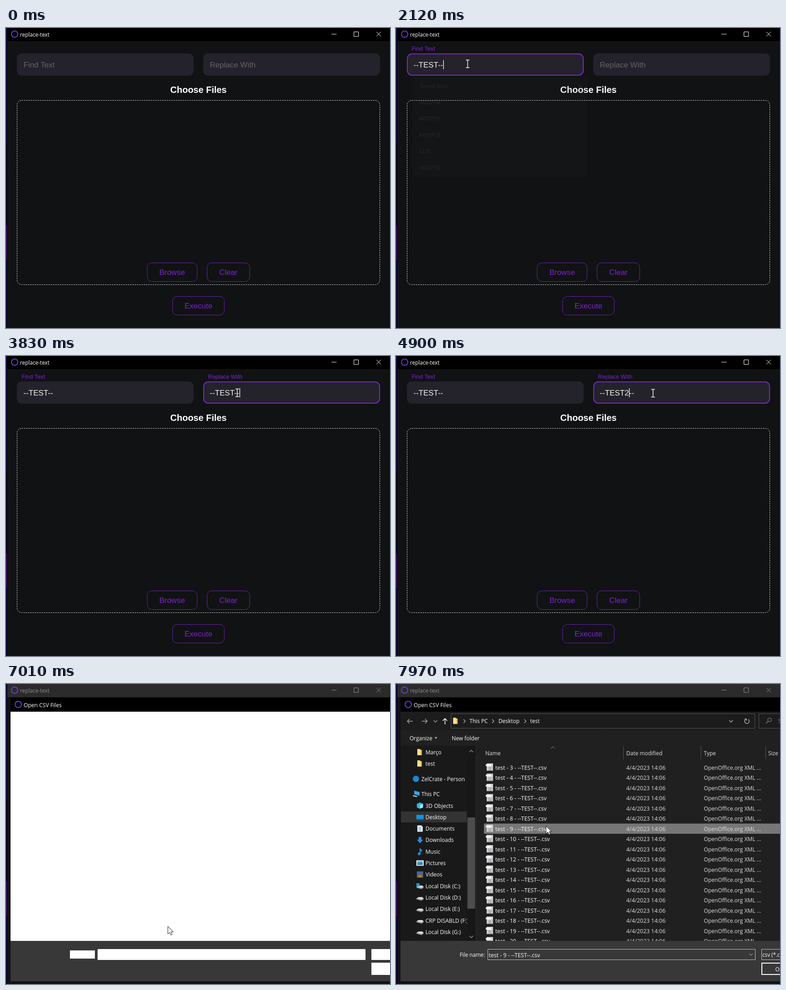
Animation of 847 by 661 pixels, one loop 8 s. Source, as an HTML page with a canvas:

```html
<!DOCTYPE html>
<html lang="en">
<head>
<meta charset="utf-8">
<title>replace-text</title>
<style>
  html, body { margin: 0; width: 100%; height: 100%; overflow: hidden; background: #111214; }
  canvas { display: block; }
</style>
</head>
<body>
<canvas id="stage" width="847" height="661"></canvas>
<script>
const ctx = document.getElementById('stage').getContext('2d');
const LOOP = 8000;
const PURPLE = '#7a24cf', PAGE = '#111214';
const APP_FONT = '"Liberation Sans", Arial, sans-serif';
const UI_FONT = '"Open Sans", "Noto Sans", sans-serif';

// Pointer path: time, x, y
const PATH = [
  [590, 262, 664], [1200, 171, 82], [1500, 171, 82], [1750, 158, 79], [2220, 158, 79],
  [2670, 577, 99], [3150, 577, 99], [3690, 510, 81], [3830, 510, 81], [4020, 502, 82],
  [4240, 502, 82], [4430, 567, 82], [5420, 567, 82], [5990, 360, 480], [6200, 357, 534],
  [7100, 357, 534], [7760, 331, 313]
];
const CLICKS = [[1220, 1420], [3000, 3140], [4160, 4300], [6330, 6470], [7830, 7940]];
const PASTE_FIND = 2050, PASTE_REPLACE = 3540, DIALOG = 7010, FILLED = 7150, SELECT = 7830;
const SAVED = ['AKJDP54', 'AKJDP51', 'AKJDP53', '1233.', 'AKJDP55'];

// Small icons, drawn around their centre
const DISK = [['#d8dadc', 'M-8 2L-3-1H5L8 2L3 5z'], ['#8b8f93', 'M-8 2L3 5L8 2V4L3 7L-8 4z']];
const ICONS = {
  folder: [['#e9b949', 'M-5-7h5l2 2h3V7H-5z'], ['#fbe08f', 'M-5-6h7V7h-7z']],
  cloud: [['#1a86d9', 'M-7 0a7 7 0 1 0 14 0a7 7 0 1 0-14 0z']],
  pc: [['#35a4e8', 'M-5-7L7-4V4L-5 1z'], ['#c9d4dc', 'M-8 3L3 5L0 7L-8 5z']],
  cube: [['#31b8e6', 'M0-7L7-4V4L0 7L-7 4V-4z'], ['#a5e6f7', 'M0-1L6-4V4L0 6z']],
  desktop: [['#1791e0', 'M-8-5H8V6H-8z'], ['#0b62a8', 'M-8 4H8V6H-8z']],
  page: [['#e9eef2', 'M-6-7h9l3 3V7H-6z'], ['#4a9bd6', 'M-4-3h7v1h-7zM-4 0h7v1h-7zM-4 3h7v1h-7z']],
  down: [['#2f8de0', 'M-3-7h6v6h4L0 7L-7-1h4z']],
  music: [['#2196e8', 'M-1-8L5-3L3 1L1-3V4A3 3 0 1 1-1 2z']],
  picture: [['#f1f4f6', 'M-8-6H8V6H-8z'], ['#4aa3dd', 'M-6-4H6V1L2-1L-2 2L-6 0z'], ['#2f6d8f', 'M-6 0L-2 2L2-1L6 1V4H-6z']],
  video: [['#59616b', 'M-7-7H7V7H-7z'], ['#2a6fb5', 'M-4-6H4V-1H-4z'], ['#b8792f', 'M-4 1H4V6H-4z']],
  disk: DISK,
  system: [...DISK, ['#1a9be8', 'M-8-6h7v7h-7z']],
  sheet: [['#d5d7d9', 'M-6-8H8V8H-6z'], ['#f5f5f5', 'M-8-6H3V-2H-8z'],
    ['#8b9095', 'M-4 0H7v1H-4zM-4 3H7v1H-4zM-4 6H7v1H-4zM1 0h1v8h-1z']]
};
const PLACES = ['3D Objects cube', 'Desktop desktop', 'Documents page', 'Downloads down', 'Music music',
  'Pictures picture', 'Videos video', 'Local Disk (C:) system', 'Local Disk (D:) disk',
  'Local Disk (E:) disk', 'CRP DISABLD (F:) disk', 'Local Disk (G:) disk'];

function rect(x, y, w, h, color) {
  ctx.fillStyle = color;
  ctx.fillRect(x, y, w, h);
}
function text(str, x, y, color, size = 12, family = UI_FONT, align = 'left', weight = '') {
  ctx.font = `${weight} ${size}px ${family}`;
  ctx.textAlign = align;
  ctx.fillStyle = color;
  ctx.fillText(str, x, y);
}
function rounded(x, y, w, h, r, fill, stroke, width = 1) {
  ctx.beginPath();
  ctx.roundRect(x, y, w, h, r);
  if (fill) { ctx.fillStyle = fill; ctx.fill(); }
  if (stroke) { ctx.strokeStyle = stroke; ctx.lineWidth = width; ctx.stroke(); }
}
function line(d, color, width = 1) {
  ctx.strokeStyle = color;
  ctx.lineWidth = width;
  ctx.stroke(new Path2D(d));
}
function disc(x, y, r, color) {
  ctx.beginPath();
  ctx.arc(x, y, r, 0, 7);
  ctx.fillStyle = color;
  ctx.fill();
}
function icon(name, x, y) {
  ctx.save();
  ctx.translate(x, y);
  for (const [color, d] of ICONS[name]) {
    ctx.fillStyle = color;
    ctx.fill(new Path2D(d));
  }
  ctx.restore();
}
function clip(x, y, w, h, draw) {
  ctx.save();
  ctx.beginPath();
  ctx.rect(x, y, w, h);
  ctx.clip();
  draw();
  ctx.restore();
}
function appMark(x, y) {
  ctx.beginPath();
  ctx.arc(x, y, 7, 0, 7);
  ctx.strokeStyle = '#6a3bd2';
  ctx.lineWidth = 2;
  ctx.stroke();
}
const ramp = (t, a, b) => Math.min(1, Math.max(0, (t - a) / (b - a)));

function pointerAt(t) {
  if (t < PATH[0][0]) return null;
  const next = PATH.findIndex(p => p[0] > t);
  if (next < 0) return PATH.at(-1).slice(1);
  const [t0, x0, y0] = PATH[next - 1], [t1, x1, y1] = PATH[next];
  const u = ramp(t, t0, t1), k = u * u * (3 - 2 * u);
  return [x0 + (x1 - x0) * k, y0 + (y1 - y0) * k];
}

function desktopEdges() {
  rect(0, 0, 2, 661, '#0b0638');
  rect(0, 255, 2, 180, '#060320');
  rect(0, 435, 2, 76, '#3a0a63');
  rect(2, 0, 1, 661, '#08080c');
  rect(846, 0, 1, 661, '#1b0b2c');
}

function titleBar(active) {
  rect(2, 0, 845, 29, active ? '#000' : '#2b2b2b');
  const ink = active ? '#fff' : '#8c8c8c';
  appMark(19, 13.5);
  text('replace-text', 31, 19, ink, 11.8);
  line('M718 13.5h11M767.5 8.5h10v10h-10zM817 8.5l10 10M827 8.5l-10 10', ink);
}

function field(x, label, value, caretIndex, focused, lastEdit, t) {
  rounded(x, 56, 390, 49, 11, '#24222a');
  if (focused) rounded(x + 1, 57, 388, 47, 10, null, PURPLE, 2);
  if (value) {
    text(label, x + 10.5, 50, PURPLE, 12.75, APP_FONT);
    text(value, x + 14.5, 86.5, '#f4f4f4', 17, APP_FONT);
  } else {
    text(label, x + 14.5, 86.5, '#676267', 17, APP_FONT);
  }
  if (focused && (t - lastEdit) % 1000 < 500) {
    ctx.font = `17px ${APP_FONT}`;
    rect(Math.round(x + 14.5 + ctx.measureText(value.slice(0, caretIndex)).width), 71, 1.3, 20, '#fff');
  }
}

function button(label, x, y, w, hover = 0) {
  ctx.save();
  if (hover) {
    ctx.globalAlpha = hover;
    ctx.shadowColor = PURPLE;
    ctx.shadowBlur = 6;
    rounded(x, y, w, 42, 10, PURPLE);
  }
  ctx.restore();
  rounded(x + .5, y + .5, w - 1, 41, 10, null, '#6c22b4');
  text(label, x + w / 2, y + 27, hover > .5 ? '#fff' : PURPLE, 17, APP_FONT, 'center');
}

function savedData(x, alpha) {
  if (!alpha) return;
  ctx.save();
  ctx.globalAlpha = alpha;
  rounded(x, 108, 386, 220, 5, '#3b3b3b');
  text('Saved data', x + 16, 132, '#ddd');
  line(`M${x + 366} 123l8 8m0-8l-8 8`, '#ddd');
  SAVED.forEach((item, i) => text(item, x + 14, 168 + i * 36, '#eee'));
  ctx.restore();
}

function app(t) {
  const found = t >= PASTE_FIND ? '--TEST--' : '';
  const twos = (t >= 4900) + (t >= 5100);
  const replaced = t >= PASTE_REPLACE ? '--TEST' + '2'.repeat(twos) + '--' : '';
  const findEdit = found ? PASTE_FIND : 1220;
  const replaceEdit = [3000, PASTE_REPLACE, 4160, 4900, 5100].findLast(e => t >= e);
  const active = t < 6470;
  field(24, 'Find Text', found, 8, t >= 1220 && t < 3000, findEdit, t);
  field(435, 'Replace With', replaced, t < 4160 ? 8 : 6 + twos, t >= 3000 && active, replaceEdit, t);
  text('Choose Files', 424.5, 143, '#fff', 20, APP_FONT, 'center', 'bold');
  ctx.setLineDash([3, 2]);
  rounded(24.5, 159.5, 800, 406, 10, null, '#d8d8d8');
  ctx.setLineDash([]);
  button('Browse', 311, 517, 111, ramp(t, 6090, 6200));
  button('Clear', 443, 517, 95);
  button('Execute', 367, 591, 115);
  savedData(36, ramp(t, 1420, 1560) * (1 - ramp(t, 2050, 2128)));
  savedData(444, ramp(t, 3070, 3210) * (1 - ramp(t, 3560, 3690)));
  titleBar(active);
}

function navigation() {
  rect(10, 61, 837, 75, '#1c1c1c');
  rect(10, 102, 837, 34, '#202020');
  line('M121.5 65.5h670v32h-670zM848 65.5h-47.5v32h47.5', '#565656');
  line('M37 82H25m5-5l-5 5l5 5', '#aaa', 1.3);
  line('M57 82h12m-5-5l5 5l-5 5', '#aaa', 1.3);
  line('M83 80l4 4l4-4', '#aaa', 1.3);
  line('M108 89V76m-5 5l5-5l5 5', '#fff', 1.5);
  line('M149 78l4 4l-4 4M212 78l4 4l-4 4M283 78l4 4l-4 4', '#bbb', 1.2);
  line('M735 80l4 4l4-4M771 78a5 5 0 1 0 6 0M769 77h4v4', '#bbb', 1.4);
  line('M828 79a4 4 0 1 0-8 0a4 4 0 1 0 8 0M821 82l-5 5', '#8c8c8c', 1.2);
  icon('folder', 131, 81);
  [['This PC', 162], ['Desktop', 226], ['test', 296]].forEach(([s, x]) => text(s, x, 86, '#fff'));
  text('Search', 843, 86, '#888');
  text('Organize', 30, 124, '#fff');
  text('New folder', 123, 124, '#fff');
  ctx.fillStyle = '#bbb';
  ctx.fill(new Path2D('M85 117h6l-3 4z'));
}

function sidebar() {
  rect(10, 136, 167, 430, '#191919');
  rect(11, 281, 145, 24, '#333');
  clip(10, 136, 147, 430, () => {
    [['Março', 150], ['test', 175]].forEach(([s, y]) => {
      icon('folder', 52, y);
      text(s, 65, y + 4.5, '#fff');
    });
    icon('cloud', 44, 209);
    text('ZelCrate - Person', 56, 213.5, '#fff');
    icon('pc', 45, 242);
    text('This PC', 56, 247, '#fff');
    PLACES.forEach((place, i) => {
      const y = 268 + i * 25.3, cut = place.lastIndexOf(' ');
      icon(place.slice(cut + 1), 53, y);
      text(place.slice(0, cut), 65, y + 4.5, '#fff');
    });
  });
  rect(157, 136, 18, 430, '#171717');
  rect(157.5, 294, 17, 201, '#4d4d4d');
  line('M162 150l4-4l4 4M162 555l4 4l4-4', '#999', 1.3);
  rect(176, 136, 1, 430, '#2c2c2c');
}

function fileList(t, pointer) {
  rect(177, 136, 670, 430, '#202020');
  [['Name', 197], ['Date modified', 508], ['Type', 679], ['Size', 821]].forEach(([s, x]) => text(s, x, 156.5, '#e2e2e2'));
  line('M501.5 137v29M672.5 137v29M815.5 137v29', '#555');
  line('M342 142l4-4l4 4', '#999');
  clip(177, 168, 670, 398, () => {
    for (let n = 3; n <= 20; n++) {
      const y = 184 + (n - 3) * 22.5;
      const hover = Math.abs(pointer[1] - y) < 11.25;
      const chosen = n === 9 && t >= SELECT;
      if (chosen || hover) rect(194, y - 11.5, 653, 22.5, chosen ? '#777' : '#4d4d4d');
      icon('sheet', 206, y - 1);
      text(`test - ${n} - --TEST--.csv`, 219, y + 4.5, '#fff', 12.4);
      text('4/4/2023 14:06', 508, y + 4.5, '#dedede', 12.4);
      text('OpenOffice.org XML ...', 679, y + 4.5, '#dedede', 12.1);
    }
  });
}

function dialog(t, pointer) {
  rect(3, 29, 844, 632, PAGE);
  rect(10, 30, 837, 31, '#000');
  appMark(27, 45);
  text('Open CSV Files', 39, 50.5, '#fff', 12.1);
  rect(10, 566, 837, 89, '#383838');
  if (t < FILLED) {
    rect(10, 61, 837, 505, '#fff');
    rect(141, 587, 55, 18, '#fff');
    rect(202, 584, 591, 24, '#fff');
    rect(806, 584, 41, 24, '#fff');
    rect(806, 614, 41, 27, '#fff');
    return;
  }
  navigation();
  sidebar();
  fileList(t, pointer);
  text('File name:', 140.5, 601, '#fff', 11.7);
  line('M202.5 584.5h590v23h-590zM848 584.5h-41.5v23h41.5', '#c4c4c4');
  line('M779 594l4 4l4-4', '#ccc');
  if (t >= SELECT + 30) text('test - 9 - --TEST--.csv', 204.5, 601.5, '#fff', 12.4);
  text('csv (*.csv)', 808, 601, '#fff', 11.7);
  line('M848 615h-41v25h41', '#fff', 2);
  text('Open', 836.5, 633, '#fff');
}

function drawPointer(t, [x, y]) {
  const beam = t < DIALOG && y > 56 && y < 105;
  if (CLICKS.some(([a, b]) => t >= a && t < b)) disc(beam ? x - 2 : x, y, 13, 'rgba(255,240,0,.5)');
  ctx.save();
  ctx.translate(x, y);
  if (beam) {
    line('M-4-8.5h3l1 1l1-1h3M-4 8.5h3l1-1l1 1h3M0-8V8', '#fff', 1.4);
  } else {
    const arrow = 'M0 0V17L4 13.3L6.6 19L9.4 17.8L6.9 12.2H12z';
    ctx.fillStyle = '#fff';
    ctx.fill(new Path2D(arrow));
    line(arrow, '#000', .9);
  }
  ctx.restore();
}

function frame(now) {
  const t = now % LOOP, pointer = pointerAt(t);
  rect(0, 0, 847, 661, PAGE);
  app(t);
  desktopEdges();
  if (t >= DIALOG) dialog(t, pointer);
  if (pointer) drawPointer(t, pointer);
  requestAnimationFrame(frame);
}
requestAnimationFrame(frame);
</script>
</body>
</html>
```
